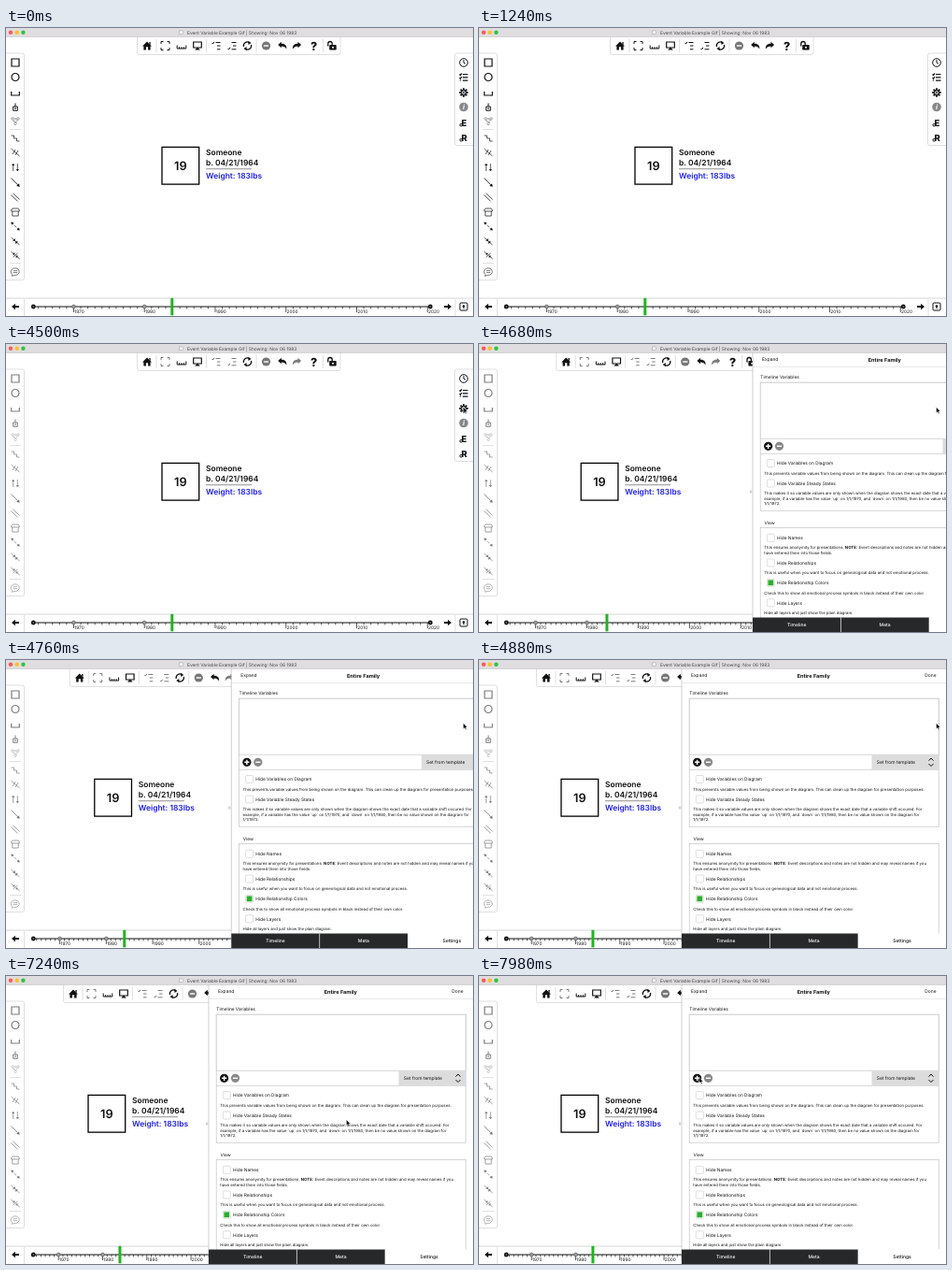
Recreate the animation shown at these times as an HTML page. Size 500 by 308 pixels, loop 8000 ms.

```html
<!DOCTYPE html>
<html lang="en">
<head>
<meta charset="utf-8">
<title>Event Variable Example</title>
<style>
html, body { margin: 0; width: 100%; height: 100%; overflow: hidden; background: #fff; }
svg { display: block; width: 500px; height: 308px; }
text { font-family: Inter, "Open Sans", sans-serif; fill: #111; white-space: pre; text-rendering: geometricPrecision; }
.line { fill: none; stroke: #111; }
.bar { fill: #fff; stroke: #d2d2d2; stroke-width: .7; }
.sep { stroke: #ccc; stroke-width: .6; }
.box { fill: #fff; stroke: #c4c4c4; stroke-width: .7; }
</style>
</head>
<body>
<svg id="stage" viewBox="0 0 500 308"></svg>
<script>
const LOOP = 8000;
const PANEL_WIDTH = 283;
const DIAGRAM_SHIFT = 79;
const OPEN = { dim: 4470, start: 4510, duration: 355 };
const AXIS = { x: 29.3, y: 298, width: 425, shrink: 0.376, first: 1964.3, years: 56.1 };

const text = (x, y, size, content, attrs = '') =>
  `<text x="${x}" y="${y}" font-size="${size}" ${attrs}>${content}</text>`;
const line = (d, attrs = '') => `<path class="line" d="${d}" ${attrs}/>`;
const thin = d => line(d, 'stroke-width=".7"');
const solid = (d, color = '#111') => `<path d="${d}" fill="${color}"/>`;
const rect = (x, y, w, h, attrs) => `<rect x="${x}" y="${y}" width="${w}" height="${h}" ${attrs}/>`;
const circle = (x, y, r, attrs = '') => `<circle cx="${x}" cy="${y}" r="${r}" ${attrs}/>`;
const at = (x, y, content, attrs = '') => `<g transform="translate(${x} ${y})" ${attrs}>${content}</g>`;
const mirror = content => `<g transform="scale(-1 1)">${content}</g>`;
const disc = (color, sign) => circle(0, 0, 4.6, `fill="${color}"`) +
  line(sign, 'style="stroke:#fff;stroke-width:1.4"');

const PLUS = 'M-2.6 0H2.6M0-2.6V2.6', MINUS = 'M-2.6 0H2.6';
const CHECK_TOP = 'M-4.5-3L-3.5-2-2-4.2', CHECK_MID = 'M-4.5 .7L-3.5 1.7-2-.5', CHECK_LOW = 'M-4.5 3L-3.5 4-2 1.8';
const UNDO = solid('M-4.6-1L-1-4.3V-2.2C3-2.4 5 0 4.5 3.6 3.4 1.1 1.8 .4-1 .4V2.3Z');
const ARROW_LEFT = solid('M-4 0L0-3.3V-1H4V1H0V3.3Z');

const topIcons = [
  [151, solid('M-5 .5L0-4.6 5 .5H3.6V4.6H1.1V1.3H-1.1V4.6H-3.6V.5Z') + solid('M2.4-4H3.7V-1L2.4-2Z')],
  [170.5, line('M-4.5-2V-4.5H-2M2-4.5H4.5V-2M4.5 2V4.5H2M-2 4.5H-4.5V2'), true],
  [188, line('M-4.8-.5V3H4.8V-.5M-2.4 3V1.2M0 3V1.2M2.4 3V1.2')],
  [205, line('M-4.3-4H4.3V2H-4.3Z', 'stroke-width="1.2"') + solid('M-2.8 4.6L0 1.6 2.8 4.6Z')],
  [225, line(CHECK_TOP + 'M-.5-3.5H4.5M1 0H4.5M1 3.8H4.5'), true],
  [242, line(CHECK_LOW + 'M-.5-3.5H4.5M1 0H4.5M-.5 3.8H4.5'), true],
  [258.5, line('M-4 1A4 4 0 0 1 2-3.4M4-1A4 4 0 0 1-2 3.4', 'stroke-width="1.3"') +
    solid('M.8-5.2L4-3 1-1ZM-.8 5.2L-4 3-1 1Z')],
  [278.5, disc('#777', MINUS)],
  [295.8, UNDO],
  [311.5, mirror(UNDO), true],
  [329.5, text(0, 4.6, 12.5, '?', 'text-anchor="middle" font-weight="800"')],
  [349, rect(-2.8, -1, 7.5, 5.6, 'rx=".8" fill="#111"') + line('M-4.2 .5V-2.3A2.2 2.2 0 0 1 .2-2.3V-1', 'stroke-width="1.3"') +
    circle(1, 1.8, 1, 'fill="#fff"')],
];

const leftIcons = [
  [37, line('M-4-4H4V4H-4Z', 'stroke-width="1.2"')],
  [52.5, circle(0, 0, 4, 'class="line" stroke-width="1.2"')],
  [70, line('M-4.3-2V2H4.3V-2', 'stroke-width="1.2"')],
  [85, line('M-2.3-1H2.3V3.3H-2.3ZM0-1V-4.5') + circle(0, 1.1, .8)],
  [99.5, line('M-3-2.5H3L0 2.5Z', 'stroke-dasharray="1.4 1"') +
    [[-3, -2.5], [3, -2.5], [0, 2.8]].map(p => circle(...p, 1.3, 'fill="#fff" stroke="#555" stroke-width=".7"')).join(''), '.75'],
  [118, thin('M-4.5-3H-1.5V0H1.5V3H4.5')],
  [133, thin('M-4.5-4L4.5 4M-3 2L0-3M0 3L3-2')],
  [149, thin('M-2.3 4V-3M2.3-4V3') + solid('M-3.9-1.9L-2.3-4.3-.7-1.9ZM.7 1.9L2.3 4.3 3.9 1.9Z')],
  [165, line('M-4.5-4.5L3.5 3.5', 'stroke-width=".8"') + solid('M4.7 4.7L1.2 4 4 1.2Z')],
  [181, thin('M-4.7-2.5L2.5 4.3M-2.5-4.3L4.7 2.5')],
  [197, thin('M-3.2-1V4H3.2V-1M-4.2-1V-3L-3-4H3L4.2-3V-1Z')],
  [212, line('M-3.5-3.5L3.5 3.5', 'stroke-width=".7" stroke-dasharray="2.5 1.3"') + solid('M-4.7-4.5L-1.6-4-4-1.6ZM4.7 4.5L1.6 4 4 1.6Z')],
  [228, thin('M-4.5-4L4.5 4') + solid('M0 0L-3-.4-.4-3ZM0 0L3 .4 .4 3Z')],
  [243, thin('M-4.7-4L-1-.8M4.7 4L1 .8M-2.5 2L2.5-2') + solid('M-.5-.5L-3.2-.7-.8-3ZM.5 .5L3.2 .7 .8 3Z')],
  [261, thin('M-3.5 4.3L-3.2 2.5A4.5 3.8 0 1 1-.8 3.4ZM-2.2-1.4H2.2M-2.2 .6H2.2'), '.8'],
];

const gear = Array.from({ length: 8 }, (_, i) =>
  rect(-1, -4.8, 2, 3, `fill="#222" transform="rotate(${i * 45})"`)).join('') +
  circle(0, 0, 2.6, 'fill="#fff" stroke="#222" stroke-width="1.5"') + circle(0, 0, .9, 'fill="#222"');
const letter = c => text(-2.4, 4, 9.5, c, 'font-weight="800"') + circle(-2.8, 2.8, 1.3, 'class="line"');
const rightIcons = [
  [37, circle(0, 0, 4.3, 'class="line"') + line('M0-2.8V0L2 1.3')],
  [52.5, line(CHECK_TOP + CHECK_MID + 'M-4.3 3.5H-2.8M-1-3H4.5M-1 .4H4.5M-1 3.6H4.5', 'stroke-width="1.2"')],
  [69, gear],
  [84.5, circle(0, 0, 4.8, 'fill="#888"') + text(0, 2.8, 7.5, 'i', 'text-anchor="middle" font-weight="700" font-style="italic" style="fill:#fff"')],
  [101, letter('E')],
  [117, letter('R')],
];

const titleBar = rect(0, 0, 500, 9.5, 'fill="#dfdddf"') + line('M0 9.4H500', 'style="stroke:#c3c1c3;stroke-width:.6"') +
  ['#fc5b57', '#fdbc2e', '#29c740'].map((c, i) => circle(5 + i * 6.7, 4.8, 2.2, `fill="${c}"`)).join('') +
  rect(185.5, 3, 4, 3.4, 'fill="#fff" stroke="#999" stroke-width=".5"') +
  text(194, 6.7, 4.85, 'Event Variable Example Gif | Showing: Nov 06 1983', 'style="fill:#444"');

const topBar = rect(140.5, 6, 217.5, 22.5, 'rx="2" class="bar"') +
  [161, 214.5, 268, 339.5].map(x => `<path class="sep" d="M${x} 12V26"/>`).join('') +
  topIcons.map(([x, icon, dims]) => at(x, 19, icon, dims ? 'class="dims"' : '')).join('');

const leftBar = rect(-3, 27, 22.5, 242.5, 'rx="2" class="bar"') +
  '<path class="sep" d="M4 108.5H16M4 251.5H16"/>' +
  `<g class="dims">${leftIcons.map(([y, icon, o = 1]) => at(10, y, icon, `opacity="${o}"`)).join('')}</g>`;

const rightBar = rect(480.5, 27, 24, 98.5, 'rx="2" class="bar"') +
  rightIcons.map(([y, icon]) => at(490, y, icon)).join('');

const person = rect(167, 127.4, 39.7, 39.7, 'fill="#fff" stroke="#000" stroke-width="1.3"') +
  text(186.8, 152, 12.8, '19', 'text-anchor="middle" font-weight="600"') +
  text(214, 136.1, 8.45, 'Someone', 'font-weight="600"') +
  text(214, 146.6, 8.45, 'b. 04/21/1964', 'font-weight="600"') +
  line('M214 150.7H263', 'style="stroke:#777;stroke-width:.8"') +
  text(214, 161.1, 8.45, 'Weight: 183lbs', 'font-weight="600" style="fill:#2020e8"');

// Timeline parts carry a year and are placed by the axis scale.
const mark = (year, content) => `<g data-year="${year}">${content}</g>`;
const lastYear = AXIS.first + AXIS.years;
const endDot = circle(0, 298, 2.4, 'fill="#111"') + circle(0, 298, .8, 'fill="#999"');
let marks = '';
for (let year = 1965; year <= 2020; year++) {
  const decade = year % 10 === 0;
  marks += mark(year, line(decade ? 'M0 298V304' : 'M0 298V300.4', 'stroke-width=".7"') +
    (decade ? text(.8, 305.4, 4.8, year) : ''));
}
marks += [1970, 1980].map(y => mark(y, circle(0, 298, 2, 'fill="#999" stroke="#555" stroke-width=".6"'))).join('') +
  mark(AXIS.first, endDot) + mark(lastYear, endDot) +
  mark(1983.9, rect(-1.5, 288.8, 3, 18.5, 'fill="#21b421"'));
const timeline = rect(0, 289, 500, 19, 'fill="#fff"') + line('M0 289H500', 'style="stroke:#ccc;stroke-width:.8"') +
  line('', 'id="axis"') + marks + at(10, 298, ARROW_LEFT) +
  at(473, 298, mirror(ARROW_LEFT)) +
  '<path class="sep" d="M19.5 290V308M481 290V308"/>' +
  at(490, 298, rect(-4, -4, 8, 8, 'rx="1" class="line"') + circle(0, -.6, 1.2) + line('M0 0V2.2'));

// Settings panel, laid out from its own left edge.
const note = (y, content) => text(12.3, y, 4.3, content);
const option = (y, label, checked) =>
  rect(15.3, y - 4, 8, 8, `rx="1" fill="#fff" stroke="#d0d0d0" stroke-width=".7"`) +
  (checked ? rect(16.4, y - 2.9, 5.8, 5.8, 'fill="#2cae2c"') : '') + text(26, y + 1.8, 4.8, label);
const tab = (i, label, active) => rect(i * 94.4, 292.5, 94.4, 16, `fill="${active ? '#fff' : '#26282a'}"`) +
  (i === 1 ? line('M94.4 292.5V308', 'style="stroke:#fff;stroke-width:.6"') : '') +
  text(i * 94.4 + 47.2, 302, 5, label, `text-anchor="middle" font-weight="500" style="fill:${active ? '#111' : '#fff'}"`);

const panel = rect(0, 9.5, 284, 299, 'fill="#fff"') + line('M0 9.5V308', 'style="stroke:#bbb;stroke-width:.7"') +
  line('M-2.6 156.5V159.5M-1.4 156.5V159.5', 'style="stroke:#999;stroke-width:.5"') +
  line('M0 24.5H284', 'style="stroke:#ddd;stroke-width:.6"') +
  text(10, 18.4, 4.9, 'Expand') + text(141.3, 18.5, 5.6, 'Entire Family', 'text-anchor="middle" font-weight="700"') +
  text(272.5, 18.4, 4.9, 'Done', 'text-anchor="end"') +
  text(8.3, 36.8, 4.8, 'Timeline Variables') +
  rect(8.2, 41.2, 267, 137, 'class="box"') + rect(8.2, 41.2, 267, 60, 'class="box"') +
  line('M8 117.3H275', 'style="stroke:#c4c4c4;stroke-width:.7"') +
  at(16.6, 109.3, disc('#111', PLUS)) + at(28.5, 109.3, disc('#888', MINUS)) +
  rect(203.5, 101.5, 71.5, 15.6, 'fill="#dcdcdc"') + text(208.8, 111, 4.9, 'Set from template') +
  line('M264.5 107.6L267 105 269.5 107.6M264.5 111L267 113.6 269.5 111') +
  option(127.5, 'Hide Variables on Diagram') +
  note(140, 'This prevents variable values from being shown on the diagram. This can clean up the diagram for presentation purposes.') +
  option(149, 'Hide Variable Steady States') +
  note(161, 'This makes it so variable values are only shown when the diagram shows the exact date that a variable shift occured. For') +
  note(166.6, 'example, if a variable has the value `up` on 1/1/1970, and `down` on 1/1/1980, then be no value shown on the diagram for') +
  note(172.2, '1/1/1972.') +
  text(12.5, 192.6, 4.8, 'View') + rect(8.2, 196.5, 267, 100, 'class="box"') +
  option(207.3, 'Hide Names') +
  note(219.3, 'This ensures anonymity for presentations. <tspan font-weight="700">NOTE:</tspan> Event descriptions and notes are not hidden and may reveal names if you') +
  note(224.9, 'have entered them into those fields.') +
  option(234, 'Hide Relationships') +
  note(246, 'This is useful when you want to focus on geneological data and not emotional process.') +
  option(255.3, 'Hide Relationship Colors', true) +
  note(267.5, 'Check this to show all emotional process symbols in black instead of their own color.') +
  option(276.8, 'Hide Layers') +
  note(289, 'Hide all layers and just show the plain diagram.') +
  tab(0, 'Timeline') + tab(1, 'Meta') + tab(2, 'Settings', true);

const pointer = '<path d="M0 0V6.3L1.5 5 2.5 7.3 3.6 6.8 2.6 4.6H4.6Z" fill="#000" stroke="#fff" stroke-width=".5"/>';

const stage = document.getElementById('stage');
stage.innerHTML = rect(0, 0, 500, 308, 'fill="#fff"') +
  `<g class="shifts">${person}</g>${timeline}${leftBar}${rightBar}<g class="shifts">${topBar}</g>` +
  `<g id="panel">${panel}</g>${titleBar}<g id="pointer">${pointer}</g>`;

const find = selector => [...stage.querySelectorAll(selector)];
const shifting = find('.shifts'), dimming = find('.dims'), yearMarks = find('[data-year]');
const [axisEl] = find('#axis'), [panelEl] = find('#panel'), [pointerEl] = find('#pointer');
const move = (el, x, y = 0) => el.setAttribute('transform', `translate(${x} ${y})`);

// Pointer strokes: [time, x, y]; each starts and ends at rest.
const strokes = [
  [[3600, 503, 78], [4060, 488, 61.5], [4340, 489.5, 67.5]],
  [[6140, 489.5, 67.5], [6460, 337.5, 93.3], [6700, 262.5, 158]],
  [[7000, 262.5, 158], [7270, 367, 152], [7780, 238, 108.5]],
  [[7820, 238, 108.5], [7980, 235.5, 108.3]],
];

function pointerAt(t) {
  const stroke = strokes.filter(s => s[0][0] <= t).pop() || strokes[0];
  const end = stroke.length - 1;
  const time = Math.min(Math.max(t, stroke[0][0]), stroke[end][0]);
  const i = Math.min(stroke.filter(k => k[0] <= time).length, end) - 1;
  const a = stroke[i], b = stroke[i + 1], span = b[0] - a[0], u = (time - a[0]) / span;
  const slope = (k, c) => k === 0 || k === end ? 0 :
    (stroke[k + 1][c] - stroke[k - 1][c]) / (stroke[k + 1][0] - stroke[k - 1][0]);
  return [1, 2].map(c => {
    const blend = u * u * (3 - 2 * u);
    return a[c] + (b[c] - a[c]) * blend +
      span * u * (1 - u) * ((1 - u) * slope(i, c) - u * slope(i + 1, c));
  });
}

function draw(t) {
  const u = Math.min(Math.max((t - OPEN.start) / OPEN.duration, 0), 1);
  const open = 1 - (1 - u) ** 2;
  const width = AXIS.width * (1 - AXIS.shrink * open);
  panelEl.style.display = open ? '' : 'none';
  move(panelEl, 500 - PANEL_WIDTH * open);
  shifting.forEach(el => move(el, -DIAGRAM_SHIFT * open));
  dimming.forEach(el => el.setAttribute('opacity', t < OPEN.dim ? 1 : .55));
  axisEl.setAttribute('d', `M${AXIS.x} ${AXIS.y}h${width}`);
  yearMarks.forEach(el => move(el, AXIS.x + (el.dataset.year - AXIS.first) / AXIS.years * width));
  move(pointerEl, ...pointerAt(t));
}

const begin = performance.now();
function tick() {
  draw((performance.now() - begin) % LOOP);
  requestAnimationFrame(tick);
}
tick();
</script>
</body>
</html>
```
